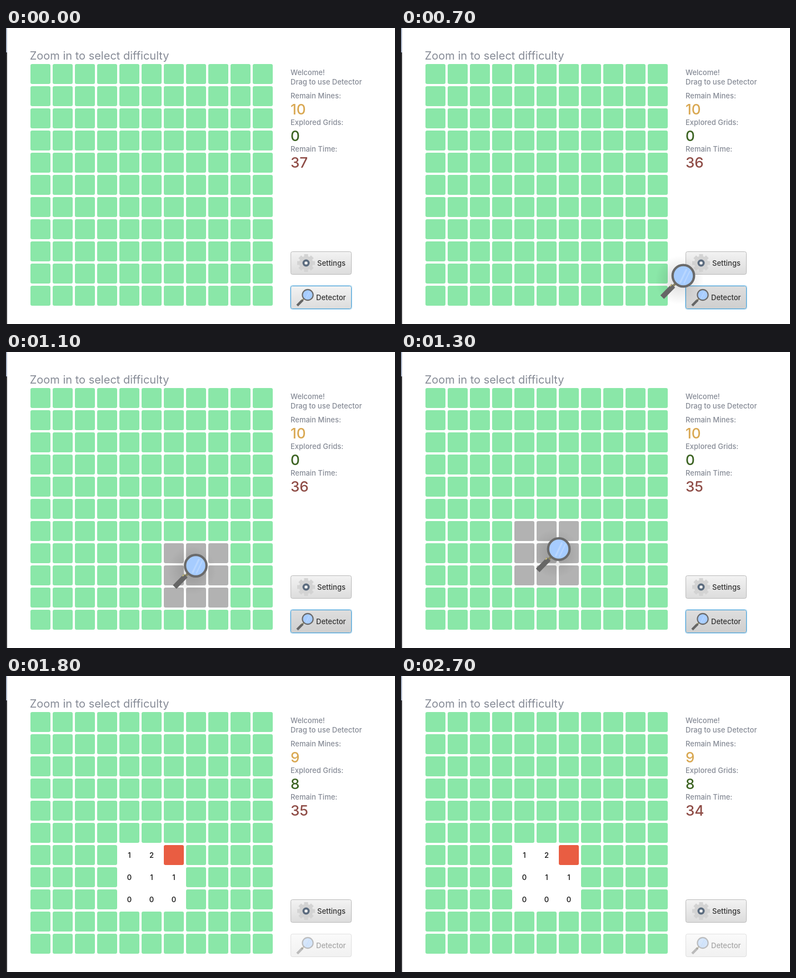
An HTML page with a canvas that plays this animation: 700x534 px, repeating every 2800 ms.

```html
<!DOCTYPE html>
<html>
<head>
<meta charset="utf-8">
<style>
  html, body { margin: 0; width: 100%; height: 100%; overflow: hidden; background: #fff; }
  canvas { display: block; }
</style>
</head>
<body>
<canvas width="700" height="534"></canvas>
<script>
const ctx = document.querySelector('canvas').getContext('2d');
const LOOP = 2800, STEP = 100;
const PRESS = 300, DRAG = 500, DROP = 1500;
const GREY = '#868b96', GREEN = '#8ae7a8';
// Lens centre while dragging: [time, x, y]
const path = [[500, 537, 471], [600, 526, 459], [700, 508, 447], [900, 427.5, 418.5],
              [1100, 341.5, 385.5], [1300, 284, 355.5], [1500, 274, 350]];
const revealed = ['12*', '011', '000'];
const FIRST_COL = 4, FIRST_ROW = 6;

function text(str, x, y, color = GREY, size = 13, align = 'left') {
  ctx.font = `${size === 20 ? 400 : 500} ${size}px Inter, sans-serif`;
  ctx.textAlign = align;
  ctx.fillStyle = color;
  ctx.fillText(str, x, y);
}

function box(x, y, w, h, fill, stroke) {
  ctx.beginPath();
  ctx.roundRect(x, y, w, h, 3);
  ctx.fillStyle = fill;
  ctx.fill();
  if (stroke) {
    ctx.strokeStyle = stroke;
    ctx.lineWidth = 1;
    ctx.stroke();
  }
}

function line(x1, y1, x2, y2, color, width) {
  ctx.beginPath();
  ctx.moveTo(x1, y1);
  ctx.lineTo(x2, y2);
  ctx.strokeStyle = color;
  ctx.lineWidth = width;
  ctx.stroke();
}

function disc(x, y, r, fill) {
  ctx.beginPath();
  ctx.arc(x, y, r, 0, 2 * Math.PI);
  ctx.fillStyle = fill;
  ctx.fill();
}

function magnifier(x, y, scale) {
  ctx.save();
  ctx.translate(x, y);
  ctx.scale(scale, scale);
  line(-14, 14, -22, 22, '#8b8562', 4);
  line(-18, 18, -38, 38.5, '#666', 9);
  line(-21, 16, -24, 19, '#c9bd7c', 2);
  disc(0, 0, 18, '#a6ccff');
  line(-6, 13, 6, -12, '#b9d7ff', 3);
  line(1, 14, 12, -9, '#b9d7ff', 2);
  ctx.beginPath();
  ctx.arc(0, 0, 19.3, 0, 2 * Math.PI);
  ctx.strokeStyle = '#6a6a6a';
  ctx.lineWidth = 4.2;
  ctx.stroke();
  ctx.restore();
}

function gear(x, y) {
  ctx.save();
  ctx.translate(x, y);
  for (let i = 0; i < 4; i++) {
    line(-16, 0, 16, 0, '#d3d3d3', 7);
    ctx.rotate(Math.PI / 4);
  }
  disc(0, 0, 12.5, '#d3d3d3');
  disc(0, 0, 6.5, '#5b6b7e');
  disc(0, 0, 2.8, '#f0f0f0');
  ctx.restore();
}

function button(y, border, top, bottom) {
  const shade = ctx.createLinearGradient(0, y, 0, y + 42);
  shade.addColorStop(0, top);
  shade.addColorStop(1, bottom);
  box(512.5, y + .5, 109, 41, shade, border);
}

function lensAt(t) {
  const i = path.findIndex(p => p[0] > t);
  const [a, b] = [path[i - 1], path[i]];
  const k = (t - a[0]) / (b[0] - a[0]);
  return [a[1] + (b[1] - a[1]) * k, a[2] + (b[2] - a[2]) * k];
}

function drawGrid(t, lens) {
  // The pointer holds the middle of the magnifier icon.
  const col = lens ? Math.floor((lens[0] - 52) / 40) : -9;
  const row = lens ? Math.floor((lens[1] - 54) / 40) : -9;
  const inside = col >= 0 && col < 11 && row >= 0 && row < 11;
  for (let r = 0; r < 11; r++) {
    for (let c = 0; c < 11; c++) {
      const x = 44 + c * 40, y = 65 + r * 40;
      const value = t >= DROP && revealed[r - FIRST_ROW]?.[c - FIRST_COL];
      const hover = inside && Math.abs(c - col) < 2 && Math.abs(r - row) < 2;
      if (value && value !== '*') text(value, x + 18, y + 23, '#111', 13, 'center');
      else box(x, y, 36, 36, value ? '#e95d42' : hover ? '#b2b2b2' : GREEN);
    }
  }
}

function drawPanel(t) {
  const done = t >= DROP;
  text('Welcome!', 512, 85);
  text('Drag to use Detector', 512, 102);
  text('Remain Mines:', 512, 127);
  text(done ? 9 : 10, 512, 156, '#d9a852', 26);
  text('Explored Grids:', 512, 175);
  text(done ? 8 : 0, 512, 204, '#3c6322', 26);
  text('Remain Time:', 512, 223);
  text(37 - Math.floor((t + 700) / 1000), 512, 252, '#8f4d47', 26);

  button(403, '#bababa', '#f3f3f3', '#dcdcdc');
  gear(540, 424);
  text('Settings', 560, 429, '#333');

  ctx.save();
  if (done) {
    ctx.globalAlpha = .4;
    button(465, '#bababa', '#f3f3f3', '#dcdcdc');
  } else {
    box(511.5, 464.5, 111, 43, '#fff', '#b9dcf2');
    if (t >= PRESS) button(465, '#4ba3d8', '#dedede', '#cfcfcf');
    else button(465, '#4ba3d8', '#f3f3f3', '#dcdcdc');
  }
  magnifier(543, 481.5, .5);
  text('Detector', 558, 491, '#333');
  ctx.restore();
}

function draw(t) {
  ctx.fillStyle = '#fff';
  ctx.fillRect(0, 0, 700, 534);
  ctx.fillStyle = '#aab4c6';
  ctx.fillRect(0, 0, 2, 44);
  ctx.fillStyle = '#333336';
  ctx.fillRect(0, 44, 2, 490);
  text('Zoom in to select difficulty', 42.7, 57, GREY, 20);

  const lens = t >= DRAG && t < DROP ? lensAt(t) : null;
  drawGrid(t, lens);
  drawPanel(t);
  if (lens) {
    const [x, y] = lens;
    const halo = ctx.createRadialGradient(x - 7, y + 8, 14, x - 7, y + 8, 44);
    halo.addColorStop(0, 'rgba(0,0,0,.1)');
    halo.addColorStop(1, 'rgba(0,0,0,0)');
    disc(x - 7, y + 8, 44, halo);
    magnifier(x, y, 1);
  }
}

function tick() {
  draw(Math.floor(performance.now() % LOOP / STEP) * STEP);
  requestAnimationFrame(tick);
}
tick();
</script>
</body>
</html>
```
